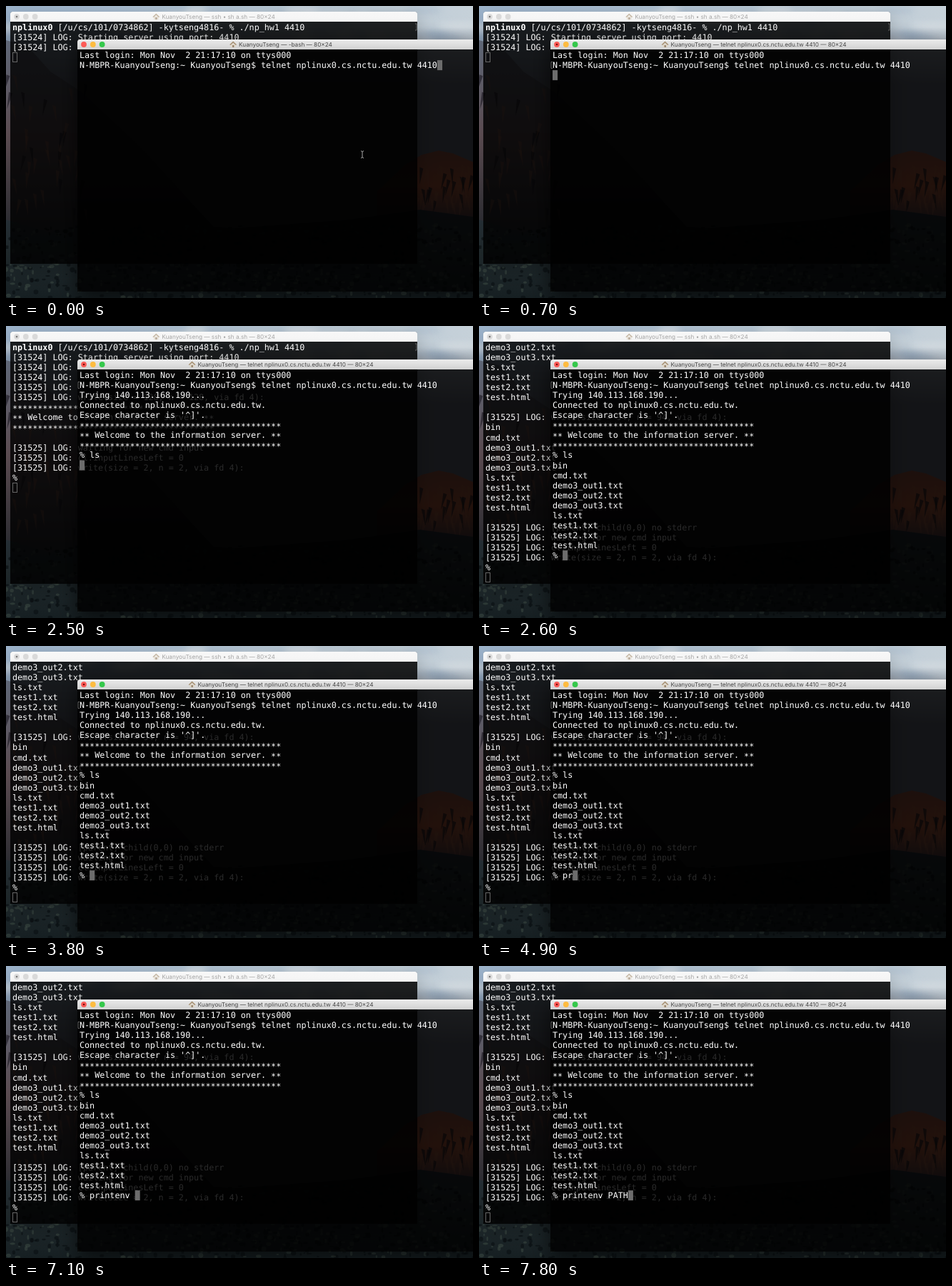
These frames come from a looping animation (654x410 px, 8 s). An HTML page with a canvas:

```html
<!DOCTYPE html>
<html lang="en">
<head>
<meta charset="utf-8">
<title>Terminal session</title>
<style>
html, body { margin: 0; width: 100%; height: 100%; overflow: hidden; background: #0b1015; }
canvas { display: block; }
</style>
</head>
<body>
<canvas id="stage" width="654" height="410"></canvas>
<script>
const W = 654, H = 410, LOOP = 8000;
const COL = 7.056, ROW = 14.06;
const MONO = '11.72px "DejaVu Sans Mono", monospace';
const USER = 'KuanyouTseng';
const ctx = document.getElementById('stage').getContext('2d');

// ---- terminal contents ----
const stars = '*'.repeat(40);
const welcome = [stars, '** Welcome to the information server. **', stars];
const files = ['bin', 'cmd.txt', 'demo3_out1.txt', 'demo3_out2.txt', 'demo3_out3.txt',
  'ls.txt', 'test1.txt', 'test2.txt', 'test.html'];
const log = (text, pid = 31525) => `[${pid}] LOG: ${text}`;
const sent = n => log(`write(size = ${n}, n = ${n}, via fd 4):`);
const ready = [log('waiting for new cmd input'), log('cl.inputLinesLeft = 0'), sent(2), '%', ''];

const started = ['nplinux0 [/u/cs/101/0734862] -kytseng4816- % ./np_hw1 4410',
  log('Starting server using port: 4410', 31524), log('', 31524)];
const serverStates = [
  [0, [...started, '']],
  [800, [...started, log('', 31524), log(''), sent(128), ...welcome, '', ...ready]],
  [2600, [...files.slice(3), '', sent(94), ...files, '',
    log('[parent] child(0,0) no stderr'), ...ready]]
];

const login = ['Last login: Mon Nov  2 21:17:10 on ttys000',
  `N-MBPR-${USER}:~ ${USER}$ telnet nplinux0.cs.nctu.edu.tw 4410`];
const connected = [...login, 'Trying 140.113.168.190...', 'Connected to nplinux0.cs.nctu.edu.tw.',
  "Escape character is '^]'.", ...welcome];
const listed = [...connected, '% ls', ...files];
const clientStates = [
  [0, login], [700, [...login, '']], [800, [...connected, '% ']],
  [1700, [...connected, '% l']], [2200, [...connected, '% ls']],
  [2500, [...connected, '% ls', '']], [2600, [...listed, '% ']]
];
const keyTimes = [4600, 4900, 5200, 5400, 5500, 5800, 6300, 6600, 6800, 7300, 7400, 7600, 7800];
keyTimes.forEach((t, i) =>
  clientStates.push([t, [...listed, '% ' + 'printenv PATH'.slice(0, i + 1)]]));

const stateAt = (states, t) => states.filter(s => s[0] <= t).pop()[1];

// ---- wallpaper ----
function poly(c, color, ...p) {
  c.fillStyle = color;
  c.beginPath();
  for (let i = 0; i < p.length; i += 2) c.lineTo(p[i], p[i + 1]);
  c.fill();
}

function fade(c, x0, y0, x1, y1, ...colors) {
  const g = c.createLinearGradient(x0, y0, x1, y1);
  colors.forEach((k, i) => g.addColorStop(i / (colors.length - 1), k));
  return g;
}

function blob(c, x, y, rx, ry, color) {
  c.fillStyle = color;
  c.beginPath();
  c.ellipse(x, y, rx, ry, 0, 0, 7);
  c.fill();
}

function makeWallpaper() {
  const cv = document.createElement('canvas');
  cv.width = W;
  cv.height = H;
  const c = cv.getContext('2d');
  let seed = 7;
  const rnd = () => (seed = seed * 16807 % 2147483647) / 2147483647;

  // sky with soft clouds
  c.fillStyle = fade(c, 0, 0, W, 0, '#9db4cc', '#b3c4d3', '#c6d1d9');
  c.fillRect(0, 0, W, H);
  c.filter = 'blur(5px)';
  for (let i = 0; i < 30; i++)
    blob(c, rnd() * W, rnd() * 50, 14 + rnd() * 24, 3 + rnd() * 5, rnd() < .6 ? '#e6eaec88' : '#7f9ab855');
  c.filter = 'none';
  c.fillStyle = fade(c, 0, 30, 0, 110, '#777d8e00', '#777d8e');
  c.fillRect(0, 0, W, H);

  // cliffs
  poly(c, fade(c, 0, 40, 0, 320, '#6b7688', '#65545a', '#2b2d33'),
    0, 48, 30, 56, 62, 92, 108, 122, 190, 200, 300, 320, 0, 330);
  poly(c, fade(c, 0, 205, 0, 300, '#b5654f', '#d86a44', '#5e4850'),
    520, 260, 560, 222, 582, 209, 606, 203, 626, 207, 654, 219, 654, 300, 520, 306);
  for (let i = 0; i < 80; i++) {
    const left = i < 40;
    const x = left ? rnd() * 110 : 574 + rnd() * 80;
    const y = left ? 95 + rnd() * 190 : 222 + rnd() * 55;
    poly(c, rnd() < .5 ? '#24212caa' : '#cf7a5855', x, y, x + 5, y + 2, x - 4 + rnd() * 12, y + 24);
  }

  // forest
  poly(c, fade(c, 0, 280, 0, 410, '#2c3740', '#222c2f', '#161f22'),
    0, 300, 60, 318, 150, 300, 320, 312, 480, 300, 580, 286, 654, 296, 654, 410, 0, 410);
  for (let i = 0; i < 900; i++)
    blob(c, rnd() * W, 308 + rnd() * 102, 1 + rnd() * 3, 1 + rnd() * 2.5,
      rnd() < .6 ? '#0a1114aa' : '#4c594f66');
  return cv;
}
const wallpaper = makeWallpaper();

// ---- windows ----
function disc(x, y, r, color) {
  blob(ctx, x, y, r, r, color);
}

function house(x, y) {
  ctx.fillStyle = '#dfd6c6';
  ctx.fillRect(x + 1.7, y + 4.5, 6.6, 4.5);
  poly(ctx, '#a89274', x, y + 5.2, x + 5, y + .4, x + 10, y + 5.2, x + 8.7, y + 6, x + 5, y + 2.8, x + 1.3, y + 6);
  ctx.fillStyle = '#94806a';
  ctx.fillRect(x + 4, y + 6, 2.2, 3);
}

function frame(x, y, { bar, lights, ink, title, dot, alpha, shadow, iconAlpha }) {
  const w = 570, h = 354, outline = new Path2D();
  outline.roundRect(x, y, w, h, [3.5, 3.5, 0, 0]);

  // shadow only outside the window
  ctx.save();
  const outside = new Path2D(outline);
  outside.rect(-100, -100, W + 200, H + 200);
  ctx.clip(outside, 'evenodd');
  ctx.shadowColor = `rgba(0,0,0,${shadow})`;
  ctx.shadowBlur = 28;
  ctx.shadowOffsetY = 9;
  ctx.fillStyle = '#000';
  ctx.fill(outline);
  ctx.restore();

  ctx.fillStyle = `rgba(0,0,0,${alpha})`;
  ctx.fillRect(x, y + 14, w, h - 14);
  ctx.fillStyle = fade(ctx, 0, y, 0, y + 14, ...bar);
  ctx.beginPath();
  ctx.roundRect(x, y, w, 14, [3.5, 3.5, 0, 0]);
  ctx.fill();

  lights.forEach((color, i) => disc(x + 9 + i * 12.8, y + 7, 3.9, color));
  if (dot) disc(x + 9, y + 7, 1.3, dot);
  ctx.font = '8.2px Inter, sans-serif';
  ctx.fillStyle = ink;
  const tw = ctx.measureText(title).width, left = x + w / 2 - (tw + 13) / 2;
  ctx.fillText(title, left + 13, y + 10);
  ctx.globalAlpha = iconAlpha;
  house(left, y + 2);
  ctx.globalAlpha = 1;
}

// Asterisks sit lower, centred on the line.
function rows(x, y, lines) {
  ctx.fillStyle = '#fff';
  ctx.font = MONO;
  lines.forEach((s, i) => {
    const base = y + i * ROW + 11;
    ctx.fillText(s.replace(/\*/g, ' '), x, base);
    ctx.fillText(s.replace(/[^*]/g, ' '), x, base + 2);
  });
}

function bracket(x, y, dir) {
  ctx.strokeStyle = '#777';
  ctx.lineWidth = .8;
  ctx.beginPath();
  ctx.moveTo(x + dir * 2, y);
  ctx.lineTo(x, y);
  ctx.lineTo(x, y + 9);
  ctx.lineTo(x + dir * 2, y + 9);
  ctx.stroke();
}

function server(t) {
  const lines = stateAt(serverStates, t), last = lines.length - 1;
  frame(6, 8, { bar: ['#f8f8f8', '#f4f4f4'], lights: Array(3).fill('#dadada'), ink: '#a5a5a5',
    title: USER + ' — ssh • sh a.sh — 80×24', dot: '#777', alpha: .85, shadow: .25, iconAlpha: .6 });
  if (t < 2600) {
    rows(9, 23, [' '.repeat(8) + lines[0].slice(8), ...lines.slice(1)]);
    ctx.font = 'bold ' + MONO;
    ctx.fillText('nplinux0', 9, 34);
    bracket(575, 25, -1);
  } else {
    rows(9, 23, lines);
  }
  ctx.strokeStyle = '#666';
  ctx.lineWidth = 1;
  ctx.strokeRect(9.5, Math.round(23 + last * ROW) + .5, 6, 13);
}

function client(t) {
  const lines = stateAt(clientStates, t), last = lines.length - 1;
  const online = t >= 700;
  frame(100, 47, { bar: ['#ebebeb', '#d2d2d2'], lights: ['#fc5b57', '#fdbc40', '#35c84b'], ink: '#454545',
    title: `${USER} — ${online ? 'telnet nplinux0.cs.nctu.edu.tw 4410' : '-bash'} — 80×24`,
    dot: online && '#7a0d0a', alpha: .84, shadow: .65, iconAlpha: 1 });
  ctx.fillStyle = '#6c6c6c';
  ctx.fillRect(103 + lines[last].length * COL, 62 + last * ROW, COL, ROW);
  rows(103, 62, lines);
  if (online) bracket(101, 78.5, 1);
}

function pointer(x, y) {
  ctx.strokeStyle = '#a8a8a8';
  ctx.lineWidth = 1;
  ctx.beginPath();
  ctx.moveTo(x, y - 4);
  ctx.lineTo(x, y + 4);
  for (const d of [-1, 1]) {
    ctx.moveTo(x - 2, y + d * 5);
    ctx.lineTo(x, y + d * 4);
    ctx.lineTo(x + 2, y + d * 5);
  }
  ctx.stroke();
}

ctx.textRendering = 'geometricPrecision';
const start = performance.now();
function draw() {
  const t = (performance.now() - start) % LOOP;
  ctx.drawImage(wallpaper, 0, 0);
  server(t);
  client(t);
  if (t < 100) pointer(499, 208.5);
  requestAnimationFrame(draw);
}
draw();
</script>
</body>
</html>
```
